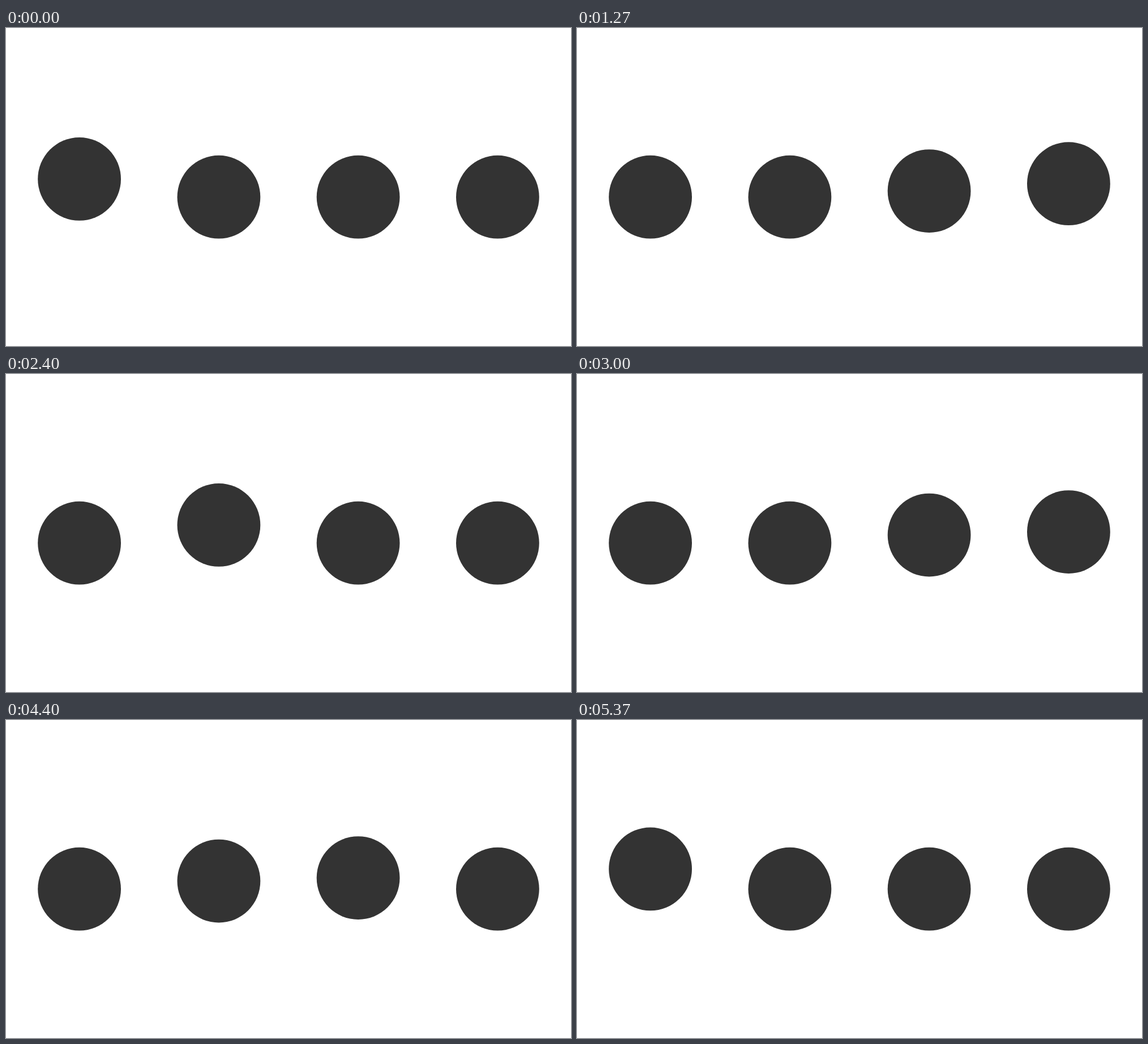
An HTML page for the animation above (5.41 s loop, 998 px wide and 561 px high).

```html
<!DOCTYPE html>
<html lang="en">
<head>
<meta charset="utf-8">
<title>Bouncing dots</title>
<style>
  html, body { margin: 0; width: 100%; height: 100%; overflow: hidden; background: #fff; }
  svg { display: block; width: 100%; height: 100%; }
</style>
</head>
<body>
<svg viewBox="0 0 998 561">
  <g id="dots" fill="#333">
    <circle cx="129.6" cy="298.2" r="73.4"/>
    <circle cx="375.9" cy="298.2" r="73.4"/>
    <circle cx="622.1" cy="298.2" r="73.4"/>
    <circle cx="868.4" cy="298.2" r="73.4"/>
  </g>
</svg>
<script>
  const LOOP = 5410, LAST = 134;   // ms, last step of the loop
  const CYCLE = 45;                // steps per wave, 25 per second
  const RISE = 9, FALL = 10, HEIGHT = 35.3, REST = 298.2;
  const STARTS = [35, 5, 15, 25];  // step at which each dot leaves rest
  const dots = [...document.querySelectorAll('#dots circle')];

  // 25 steps per second shown on a 30 Hz clock with 10 ms ticks
  function stepAt(ms) {
    const tick = Math.floor(ms / 10) * 10;
    const shown = Math.floor((tick + 4) * 0.03);
    return Math.min(LAST, Math.floor(shown * 5 / 6));
  }

  function lift(p) {
    if (p < RISE) return p / RISE;
    return Math.max(0, 1 - (p - RISE) / FALL);
  }

  function draw(ms) {
    const step = stepAt(ms % LOOP);
    dots.forEach((dot, i) => {
      const p = (step - STARTS[i] + CYCLE) % CYCLE;
      dot.setAttribute('cy', (REST - HEIGHT * lift(p)).toFixed(2));
    });
  }

  const begin = performance.now();
  function tick() {
    draw(performance.now() - begin);
    requestAnimationFrame(tick);
  }
  draw(0);
  requestAnimationFrame(tick);
</script>
</body>
</html>
```
